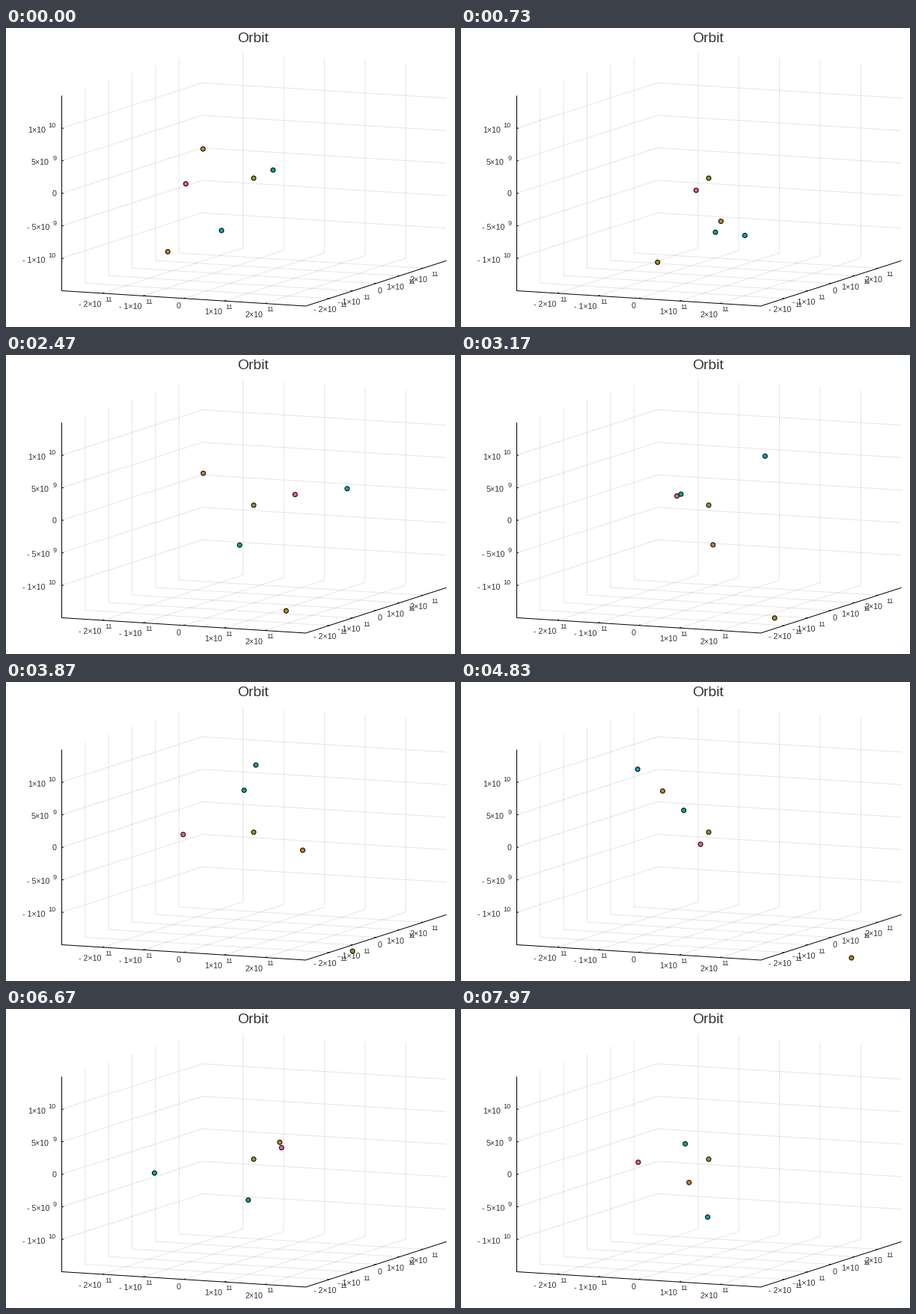
These frames come from a looping animation (600x400 px, 8000 ms). A matplotlib script:

```python
import numpy as np
import matplotlib.pyplot as plt
from matplotlib.animation import FuncAnimation

W, H, DPI = 600, 400, 100
TICK_MS, TICKS = 20, 400     # five ticks carry three steps of motion
DAYS_PER_STEP = 3
START_DAY = 7431.5           # days after J2000

# Screen geometry of the plot box (pixels, y down)
CORNER = np.array([74.5, 351.5])
XVEC = np.array([326.0, 20.5])
YVEC = np.array([188.0, -60.7])
ZVEC = np.array([0.0, -261.0])
XY_LIM, Z_LIM = 3.0, 0.15    # axis limits in units of 1e11 m
CENTER = np.array([331.0, 200.9])

# a (1e11 m), e, incl., mean longitude, degrees per day, perihelion, node, colour
PLANETS = [
    (7.7834, .0484, 1.304, 34.397, .0830868, 14.73, 100.47, "#ac8d18"),
    (2.2794, .0934, 1.850, -4.553, .5240208, 336.06, 49.56, "#00a9ad"),
    (1.4960, .0167, 0.000, 100.465, .9856091, 102.94, 0.00, "#ed5d92"),
    (1.0821, .0068, 3.395, 181.980, 1.6021303, 131.60, 76.68, "#c68125"),
    (0.5791, .2056, 7.005, 252.250, 4.0923344, 77.46, 48.33, "#00a98d"),
]
OUTER, INNER = 0, 4
SUN_COLOR = "#8e971d"
LAST_OUTER_STEP = 175        # the outer body leaves the view after this


def box(u, v, w):
    """Screen point for box coordinates in 0..1."""
    return CORNER + u * XVEC + v * YVEC + w * ZVEC


def project(x, y, z):
    return CENTER + (x * XVEC + y * YVEC) / (2 * XY_LIM) + z * ZVEC / (2 * Z_LIM)


def kepler(mean, e):
    ecc = mean
    for _ in range(12):
        ecc -= (ecc - e * np.sin(ecc) - mean) / (1 - e * np.cos(ecc))
    return ecc


def position(k, n):
    a, e, inc, lon, rate, peri, node, _ = PLANETS[k]
    lon += rate * (START_DAY + DAYS_PER_STEP * n)
    if k == INNER:
        # the innermost orbit slowly shrinks and rounds off
        t = max(0.0, n - 22.6)
        lon += .00935 * t * t
        a *= (1 + .0187 * t / (rate * DAYS_PER_STEP)) ** (-2 / 3)
        e *= np.exp(-t / 260)
    ecc = kepler(np.radians((lon - peri) % 360), e)
    nu = 2 * np.arctan2(np.sqrt(1 + e) * np.sin(ecc / 2),
                        np.sqrt(1 - e) * np.cos(ecc / 2))
    r = a * (1 - e * np.cos(ecc))
    om, inc = np.radians(node), np.radians(inc)
    arg = nu + np.radians(peri) - om
    x = r * (np.cos(om) * np.cos(arg) - np.sin(om) * np.sin(arg) * np.cos(inc))
    y = r * (np.sin(om) * np.cos(arg) + np.cos(om) * np.sin(arg) * np.cos(inc))
    return x, y, r * np.sin(arg) * np.sin(inc)


def px(size):
    return size * 72 / DPI


plt.rcParams["font.family"] = "Liberation Sans"
fig = plt.figure(figsize=(W / DPI, H / DPI), dpi=DPI, facecolor="white")
ax = fig.add_axes([0, 0, 1, 1])
ax.set_xlim(0, W)
ax.set_ylim(H, 0)
ax.axis("off")


def line(*pts, alpha=1.0, z=2):
    xs, ys = zip(*pts)
    ax.plot(xs, ys, color="black", lw=px(1), alpha=alpha, zorder=z,
            solid_capstyle="butt")


def grid(*pts):
    line(*pts, alpha=.1, z=1)


def label(x, y, s, size=10.6, ha="right"):
    ax.text(x, y, s, fontsize=px(size), ha=ha, va="baseline",
            color="#333333", zorder=3)


def power(right, base, mantissa, exponent, lift=7.2):
    """Number like 2×10 with a raised exponent, ending at x = right."""
    label(right, base - lift, exponent, 9.2)
    gap = 14.3 if len(exponent) == 2 else 9.6
    label(right - gap, base, mantissa + "×10")


def tick(p, direction, length=2.5):
    line(p, p + direction / np.hypot(*direction) * length)


for k in (-2, -1, 0, 1, 2):
    t = .5 + k / 6
    grid(box(t, 0, 0), box(t, 1, 0), box(t, 1, 1))
    grid(box(1, t, 0), box(0, t, 0), box(0, t, 1))
    grid(box(0, 0, t), box(0, 1, t), box(1, 1, t))

    (x1, y1), (x2, y2), (x3, y3) = ends = box(t, 0, 0), box(1, t, 0), box(0, 0, t)
    for end, direction in zip(ends, (YVEC, -XVEC, XVEC)):
        tick(end, direction)

    if k == 0:
        label(x1 - 7.3, y1 + 13.3, "0", ha="center")
        label(x2 + 4.7, y2 + 13, "0", ha="center")
        label(67.5, y3 + 4.3, "0")
        continue
    sign, wide = ("- ", 1) if k < 0 else ("", 0)
    number = sign + str(abs(k))
    power(x1 + 11.5 + 1.3 * wide, y1 + 18.1, number, "11")
    power(x2 + 21 + 3.3 * wide, y2 + 18.1, number, "11")
    if abs(k) == 2:
        power(67, y3 + 5.5, sign + "1", "10", 6.3)
    else:
        power(67.5, y3 + 5.5, sign + "5", "9", 6.3)

line(box(0, 0, 1), box(0, 0, 0), box(1, 0, 0), box(1, 1, 0))
label(330.3, 19, "Orbit", 19.4, "center")


def marker(color, z):
    return ax.add_patch(plt.Circle(CENTER, 3, fc=color, ec="black",
                                   lw=px(1), zorder=z))


dots = [marker(p[-1], 5 + i) for i, p in enumerate(PLANETS)]
sun = marker(SUN_COLOR, 11)


def update(i):
    n = (3 * i + 2) // 5
    for k, dot in enumerate(dots):
        dot.center = project(*position(k, n))
    dots[OUTER].set_visible(n <= LAST_OUTER_STEP)
    return dots


anim = FuncAnimation(fig, update, frames=TICKS, interval=TICK_MS,
                     init_func=lambda: update(0), repeat=True, repeat_delay=0)
plt.show()
```
